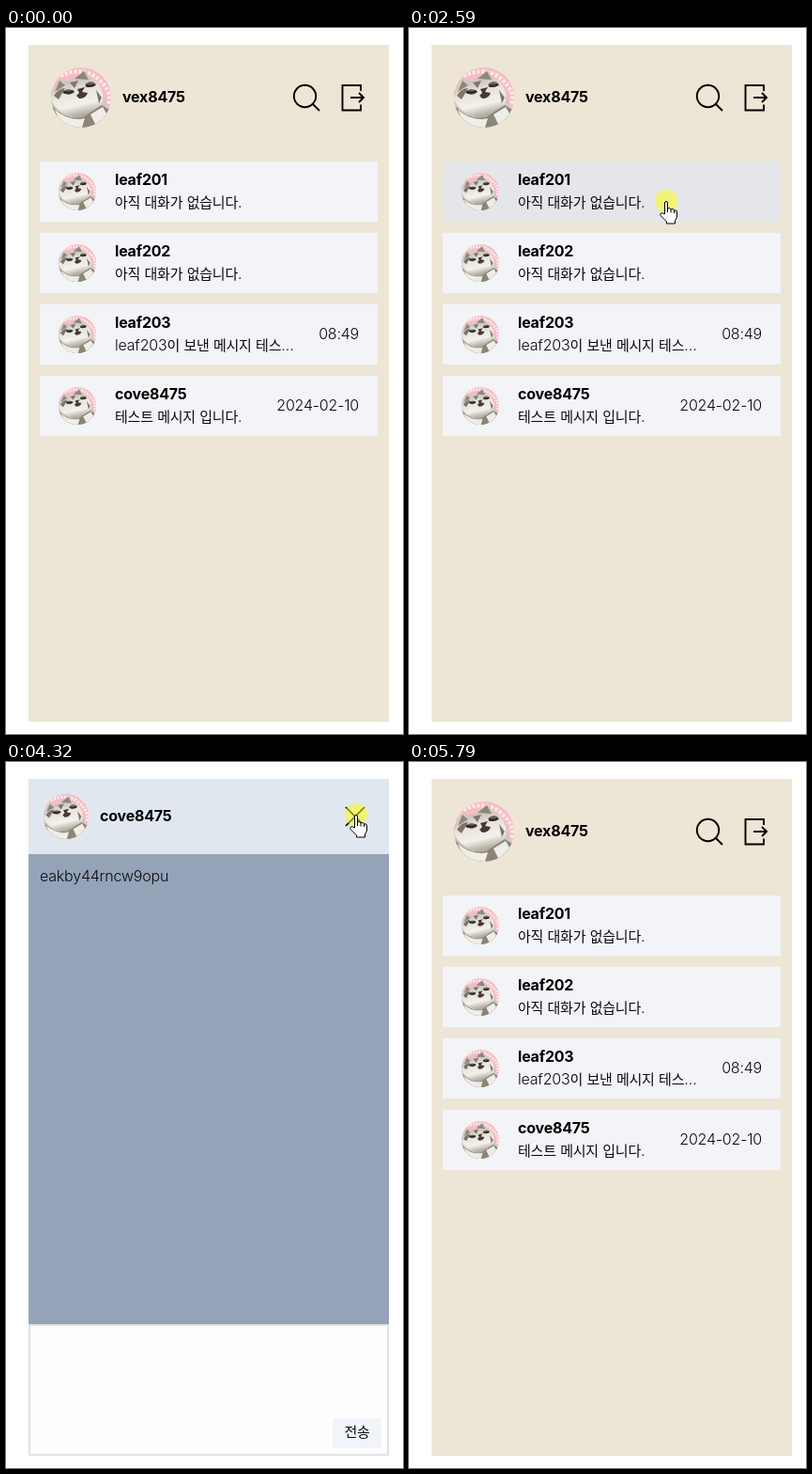
These frames come from a looping animation (423x751 px, 6.39 s). An HTML page:

```html
<!DOCTYPE html>
<html lang="ko">
<head>
<meta charset="utf-8">
<title>Chat</title>
<style>
html, body { margin: 0; width: 100%; height: 100%; overflow: hidden; background: #fff; }
body { position: relative; font: 300 16px/24px Inter, "Noto Sans CJK KR", "Noto Sans CJK", sans-serif; letter-spacing: -.2px; color: #0b0b0d; }
.view, .row, .abs, .text, svg { position: absolute; }
.view { left: 24px; top: 18px; width: 384px; height: 720px; }
.text { white-space: nowrap; margin-top: -1px; }
b { font-weight: 700; color: #000; }
i { font: 300 15px/1 "Noto Sans CJK KR", "Noto Sans CJK", sans-serif; }
#list { background: #ede6d6; }
#chat { background: #95a3b9; }
.row { left: 12px; width: 360px; height: 64px; background: #f2f4f7; }
.row.on { background: #e4e6ea; }
.bar { left: 0; top: 0; width: 384px; height: 80px; background: #e1e7ef; }
.input { left: 0; top: 580px; width: 380px; height: 136px; border: 2px solid #e2e2e2; background: #fefefe; }
.send { left: 324px; top: 680px; width: 52px; height: 32px; background: #f1f5f9; line-height: 28px; text-align: center; }
.line { fill: none; stroke: #000; stroke-width: 1.9; }
#overlay { left: 0; top: 0; pointer-events: none; }
</style>
</head>
<body>
<svg width="0" height="0">
  <defs>
    <clipPath id="round"><circle cx="32" cy="32" r="32"/></clipPath>
    <linearGradient id="fur" x1="0" y1="0" x2=".3" y2="1">
      <stop offset="0" stop-color="#b9b2a7"/>
      <stop offset=".4" stop-color="#e6e2da"/>
      <stop offset=".75" stop-color="#f3f1ec"/>
      <stop offset="1" stop-color="#b3ad9f"/>
    </linearGradient>
    <symbol id="cat" viewBox="0 0 64 64">
      <g clip-path="url(#round)">
        <path fill="#f8bcc4" d="M0 0h64v64H0z"/>
        <path fill="none" stroke="#fdecee" stroke-width="4" stroke-dasharray="3 2" d="M10 9Q34-2 50 12T61 40"/>
        <path fill="#cfcac0" d="M-2 30L9 12l10 3 17-12 8 11 14 20 6 30H-2z"/>
        <path fill="url(#fur)" d="M0 34Q4 17 20 14T48 14Q60 28 52 44L34 54Q8 52 0 34z"/>
        <path fill="#8f877b" d="M25 12l10-8 5 9zM4 26l5-12 6 5z"/>
        <path fill="#8b8578" d="M0 40q14 16 34 13l20-13 10 6v18H0z"/>
        <path fill="#efede7" d="M4 45q16 13 32 9l-3 10H12zM42 50l13-8 7 12-14 8z"/>
        <path fill="#7d756a" d="M3 30q5-8 12-8l-7 12zM20 16l9-2-4 8zM48 24l6 8-3 6z"/>
        <path fill="#6a6158" d="M12 26q7-6 13 0-6 6-13 0zM36 18q7-6 12 0-5 5-12 0z"/>
        <path fill="none" stroke="#2f2a26" stroke-width="2.500" d="M13 26q6 2 11-1M37 19q5 2 10-1"/>
        <path fill="#463834" d="M28 23l8-2-3 5 6 1q-2 6-9 6l-3-3 3-3z"/>
      </g>
    </symbol>
  </defs>
</svg>

<div id="list" class="view">
  <svg width="64" height="64" style="left:24px;top:24px"><use href="#cat"/></svg>
  <b class="text" style="left:100px;top:44px">vex8475</b>
  <svg class="line" width="384" height="100" style="left:0;top:0">
    <circle cx="294.5" cy="54.5" r="11.7"/>
    <path d="M303 63l7 7M354 49v-6h-19.500v26.500h19.500v-6M343 56h14M352 51l5 5-5 5"/>
  </svg>
</div>

<div id="chat" class="view">
  <div class="abs bar"></div>
  <svg width="48" height="48" style="left:16px;top:16px"><use href="#cat"/></svg>
  <b class="text" style="left:76px;top:28px">cove8475</b>
  <svg class="line" width="384" height="80" style="left:0;top:0"><path stroke-width="1.7" d="M338 30l20 20M358 30l-20 20"/></svg>
  <div id="room" class="text" style="left:12px;top:92px"></div>
  <div class="abs input"></div>
  <div class="abs send"><i>전송</i></div>
</div>

<svg id="overlay" width="423" height="751">
  <g id="cursor">
    <circle id="press" r="12" fill="#ff0" fill-opacity=".5"/>
    <path id="arrow" fill="#fff" stroke="#000" d="M.5.5v16l3.7-3.5 2.4 5.7 2.6-1.1-2.4-5.5h5z"/>
    <g id="hand" fill="#fff" stroke="#000" stroke-linejoin="round">
      <path d="M-1.500 14V2Q-1.500.5 0 .5T1.500 2V8Q4.500 6.500 5 9 8 7.500 8.500 10 11.500 9 11.500 12v5l-2 4v3h-9v-2L-6 15.500Q-6.500 12-3.500 13z"/>
      <path fill="none" d="M1.500 8v4M5 9v3.500M8.500 10v3"/>
    </g>
  </g>
</svg>

<script>
const LOOP = 6390;
const $ = id => document.getElementById(id);
const list = $('list'), chat = $('chat'), room = $('room');

const hangul = s => s.replace(/[가-힣]+/g, '<i>$&</i>');
const friends = [
  ['leaf201', '아직 대화가 없습니다.', ''],
  ['leaf202', '아직 대화가 없습니다.', ''],
  ['leaf203', 'leaf203이 보낸 메시지 테스…', '08:49'],
  ['cove8475', '테스트 메시지 입니다.', '2024-02-10'],
];
const rows = friends.map(([name, text, date], n) => {
  const row = document.createElement('div');
  row.className = 'row';
  row.style.top = 124 + 76 * n + 'px';
  row.innerHTML = `<svg width="40" height="40" style="left:20px;top:12px"><use href="#cat"/></svg>
    <b class="text" style="left:80px;top:8px">${name}</b>
    <span class="text" style="left:80px;top:32px">${hangul(text)}</span>
    <span class="text" style="right:20px;top:20px">${date}</span>`;
  return list.appendChild(row);
});

// [open, close, room id]
const chats = [
  [1000, 2270, 'y8h7h0g5h9fzxiu'],
  [2730, 3590, '0egocxhwl0fvrww'],
  [3990, 4450, 'eakby44rncw9opu'],
  [5060, 5520, 'k3vd8u0aqm5tzeh'],
];
// [down, up]
const presses = [[870, 935], [2130, 2200], [2590, 2730], [3460, 3530],
  [3860, 3930], [4320, 4390], [4920, 4990], [5390, 5450]];
// [time, x, y]
const path = [
  [130, 186, 770], [470, 154, 417], [1400, 154, 417], [1930, 366, 58],
  [2270, 366, 58], [2590, 274, 184], [2790, 274, 184], [3330, 375, 62],
  [3450, 373, 56], [3590, 373, 56], [3860, 262, 250], [3990, 262, 250],
  [4300, 373, 56], [4450, 373, 56], [4840, 234, 329], [5060, 234, 329],
  [5370, 373, 57], [5520, 373, 57], [5790, 400, 22],
];

const during = (spans, t) => spans.find(([a, b]) => t >= a && t < b);
const inside = (x, y, l, top, w, h) => x >= l && x < l + w && y >= top && y < top + h;
const show = (el, on) => { el.style.visibility = on ? 'visible' : 'hidden'; };

function pointAt(t) {
  const n = path.findIndex(p => p[0] > t);
  if (n < 1) return path[n < 0 ? path.length - 1 : 0].slice(1);
  const [t0, x0, y0] = path[n - 1], [t1, x1, y1] = path[n];
  const u = (t - t0) / (t1 - t0), k = u * u * (3 - 2 * u);
  return [x0 + (x1 - x0) * k, y0 + (y1 - y0) * k];
}

function draw() {
  const t = performance.now() % LOOP;
  const [x, y] = pointAt(t);
  const open = during(chats, t);
  const present = t >= 200 && t < 5790;

  chat.style.display = open ? 'block' : 'none';
  room.textContent = open ? open[2] : '';

  let hot = open ? inside(x, y, 354, 40, 36, 36)
                 : inside(x, y, 304, 58, 32, 32) || inside(x, y, 354, 58, 32, 32);
  rows.forEach((row, n) => {
    const on = present && !open && inside(x, y, 36, 142 + 76 * n, 360, 64);
    row.classList.toggle('on', on);
    hot = hot || on;
  });

  $('cursor').setAttribute('transform', `translate(${Math.round(x)} ${Math.round(y)})`);
  show($('hand'), present && hot);
  show($('arrow'), present && !hot);
  show($('press'), during(presses, t));
  requestAnimationFrame(draw);
}
draw();
</script>
</body>
</html>
```
